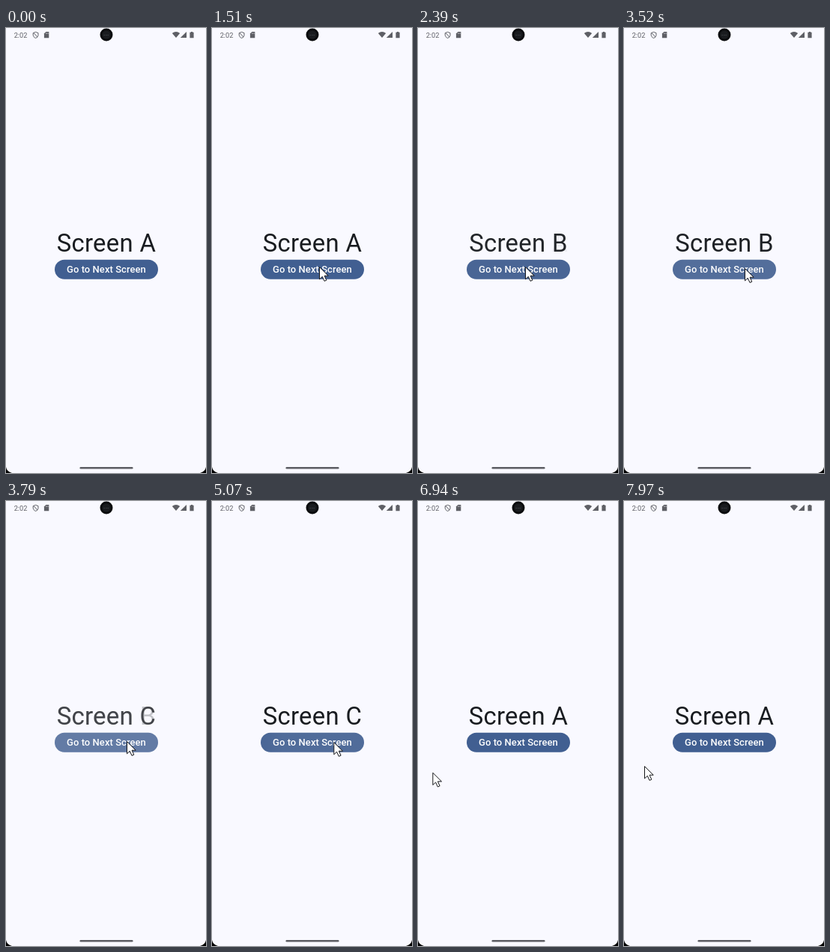
Write an HTML page that moves like this. It is 267 px wide and 593 px high and loops after 8000 ms.

```html
<!DOCTYPE html>
<html lang="en">
<head>
<meta charset="utf-8">
<title>Screen navigation</title>
<style>
  html, body { margin: 0; width: 100%; height: 100%; overflow: hidden; background: #f9f9ff; }
  svg { display: block; width: 100%; height: 100%; }
  text { font-family: Roboto, sans-serif; }
  .title { font-size: 32.8px; letter-spacing: .325px; fill: #191c20; text-anchor: middle; }
  .label { font-size: 12.98px; letter-spacing: .065px; font-weight: 500; fill: #fff; text-anchor: middle; }
  .status { fill: #5e5f65; }
</style>
</head>
<body>
<svg viewBox="0 0 267 593">
  <defs>
    <clipPath id="pill"><rect x="65" y="308.8" width="138" height="26" rx="13"/></clipPath>
    <radialGradient id="glow">
      <stop offset=".6" stop-color="#fff" stop-opacity=".08"/>
      <stop offset="1" stop-color="#fff" stop-opacity=".02"/>
    </radialGradient>
  </defs>
  <rect width="267" height="593" fill="#f9f9ff"/>

  <g class="status">
    <text x="10.7" y="12.7" font-size="9.2">2:02</text>
    <path d="M39.6 5.4 L43 6.7 V9 C43 11.2 41.6 12.8 39.6 13.4 C37.6 12.8 36.2 11.2 36.2 9 V6.7 Z M37 6.5 L42 12"
          fill="none" stroke="#5e5f65"/>
    <path d="M53.4 5 H57.3 V13.2 H50.9 V7.5 Z"/>
    <path d="M53.5 6.5 V8 M54.9 6.5 V8 M56.2 6.5 V8" stroke="#f9f9ff" stroke-width=".5"/>
    <path d="M221.8 6.9 Q227 3.1 232.2 6.9 L227 13.1 Z"/>
    <path d="M241 4.9 V13.1 H232.8 Z"/>
    <path d="M246.9 4.9 H249.1 V5.8 H250.6 V13.2 H245.4 V5.8 H246.9 Z"/>
  </g>
  <circle cx="134" cy="9" r="8.5" fill="#0b0c0e"/>
  <circle cx="134" cy="9" r="5.5" fill="#1a1c1f"/>
  <path d="M130.5 9.5 H137.5" stroke="#3c3f43" stroke-dasharray="1.5 1"/>

  <g id="screens"></g>

  <rect x="98.5" y="585" width="71" height="2.4" rx="1.2" fill="#5c5d63"/>
  <path d="M0 585 Q1 591 8 593 H0 Z M267 585 Q266 591 259 593 H267 Z"/>
  <path id="cursor" d="M.5 .6 V16.8 L4.3 13.3 L7 19.3 L9.8 18.1 L7.1 12.2 H12.2 Z"
        fill="#fff" stroke="#15161a" stroke-linejoin="round"/>
</svg>
<script>
const LOOP = 8000;
const FADE = 700;
const ORDER = 'ABCA';
const TAPS = [1880, 3450, 5050];

// Each move glides the pointer tip to (x, y) between two times.
const START = { x: 268, y: 474 };
const MOVES = [
  { from: 500, to: 1500, x: 143, y: 318 },
  { from: 2560, to: 2900, x: 161, y: 320 },
  { from: 4160, to: 4330, x: 162.3, y: 321 },
  { from: 5480, to: 5790, x: 141, y: 342 },
  { from: 5790, to: 6030, x: 76, y: 355 },
  { from: 6160, to: 7080, x: 16, y: 362 },
  { from: 7220, to: 7600, x: 64, y: 357 },
  { from: 7600, to: 7960, x: 27, y: 353 },
];

const clamp = v => Math.min(1, Math.max(0, v));
const mix = (a, b, k) => a + (b - a) * k;
const easeSine = k => (1 - Math.cos(Math.PI * clamp(k))) / 2;

// cubic-bezier(.4, 0, .2, 1)
function easeFade(x) {
  if (x <= 0 || x >= 1) return clamp(x);
  let lo = 0, hi = 1;
  for (let i = 0; i < 20; i++) {
    const s = (lo + hi) / 2, r = 1 - s;
    if (1.2 * r * r * s + .6 * r * s * s + s ** 3 < x) lo = s; else hi = s;
  }
  return lo * lo * (3 - 2 * lo);
}

function pointerAt(t) {
  let { x, y } = START;
  for (const move of MOVES) {
    const k = easeSine((t - move.from) / (move.to - move.from));
    x = mix(x, move.x, k);
    y = mix(y, move.y, k);
  }
  return { x, y };
}

const screens = {};
for (const name of 'ABC') {
  const group = document.createElementNS('http://www.w3.org/2000/svg', 'g');
  group.innerHTML = `
    <text class="title" x="133.9" y="298">Screen ${name}</text>
    <g clip-path="url(#pill)">
      <rect x="65" y="308" width="138" height="28" fill="#415f91"/>
      <circle class="ripple" cy="322" fill="url(#glow)"/>
    </g>
    <text class="label" x="133.9" y="326.2">Go to Next Screen</text>`;
  document.getElementById('screens').append(group);
  screens[name] = { group, ripple: group.querySelector('.ripple') };
}
const cursor = document.getElementById('cursor');

function draw(t) {
  const { x, y } = pointerAt(t);
  cursor.setAttribute('transform', `translate(${x} ${y})`);

  const tapped = TAPS.filter(time => time <= t).length;
  const current = ORDER[tapped];
  const previous = ORDER[tapped - 1];
  const age = tapped ? t - TAPS[tapped - 1] : FADE;
  const shown = easeFade(age / FADE);

  for (const [name, { group, ripple }] of Object.entries(screens)) {
    const opacity = name === current ? shown : name === previous ? 1 - shown : 0;
    group.setAttribute('opacity', opacity);
    ripple.setAttribute('cx', x);
    ripple.setAttribute('r', name === previous ? mix(105, 200, clamp(age / 225)) : 0);
  }
}

function frame() {
  draw(performance.now() % LOOP);
  requestAnimationFrame(frame);
}
frame();
</script>
</body>
</html>
```
